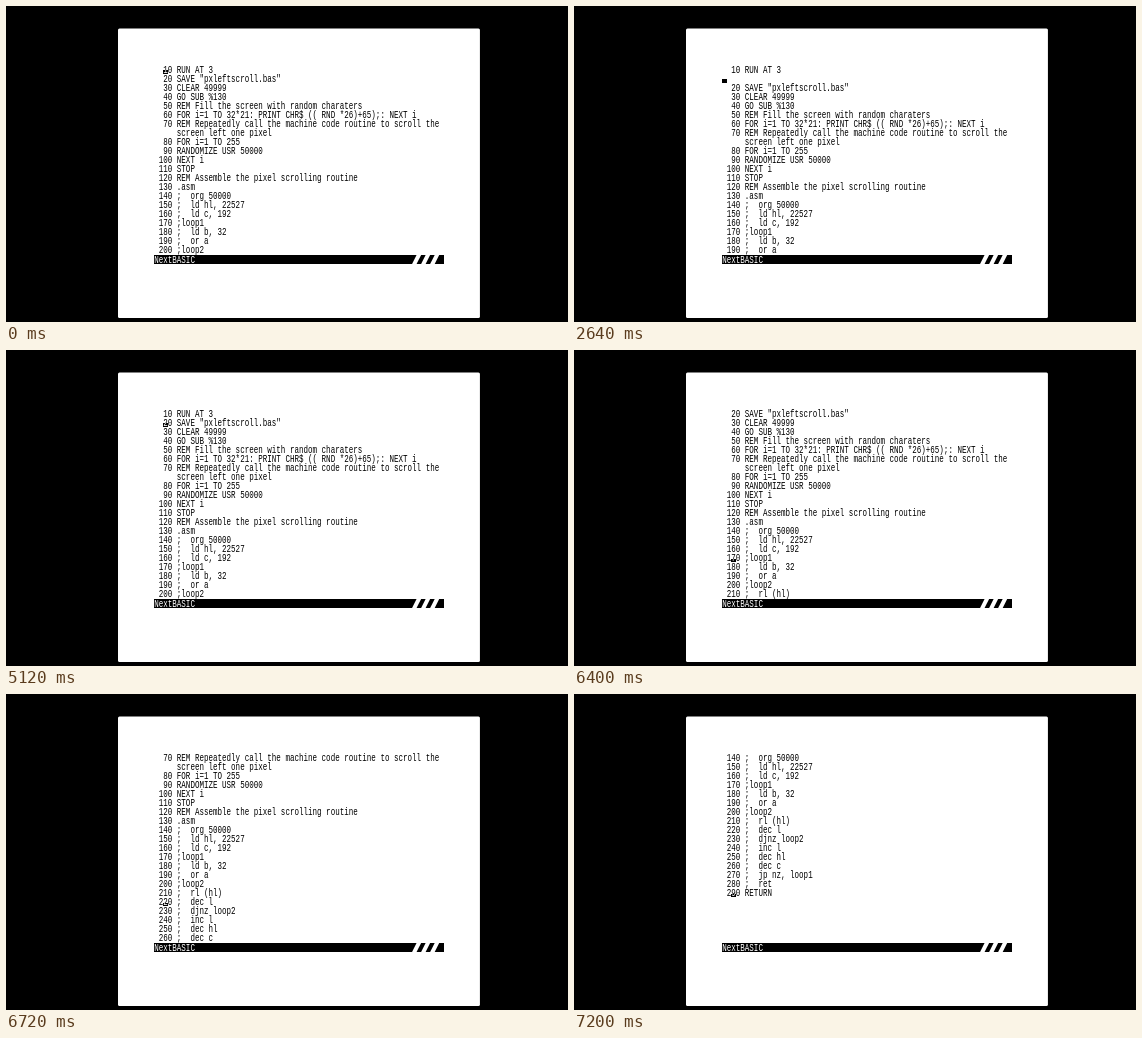
These frames come from a looping animation (562 px wide and 316 px high, 8 s). An HTML page with a canvas:

```html
<!DOCTYPE html>
<html lang="en">
<head>
<meta charset="utf-8">
<title>NextBASIC editor</title>
<style>
  html, body { margin: 0; width: 100%; height: 100%; overflow: hidden; background: #000; }
  canvas { display: block; }
</style>
</head>
<body>
<canvas id="stage" width="562" height="316"></canvas>
<script>
const listing = `  10 RUN AT 3
  20 SAVE "pxleftscroll.bas"
  30 CLEAR 49999
  40 GO SUB %130
  50 REM Fill the screen with random charaters
  60 FOR i=1 TO 32*21: PRINT CHR$ (( RND *26)+65);: NEXT i
  70 REM Repeatedly call the machine code routine to scroll the
     screen left one pixel
  80 FOR i=1 TO 255
  90 RANDOMIZE USR 50000
 100 NEXT i
 110 STOP
 120 REM Assemble the pixel scrolling routine
 130 .asm
 140 ;  org 50000
 150 ;  ld hl, 22527
 160 ;  ld c, 192
 170 ;loop1
 180 ;  ld b, 32
 190 ;  or a
 200 ;loop2
 210 ;  rl (hl)
 220 ;  dec l
 230 ;  djnz loop2
 240 ;  inc l
 250 ;  dec hl
 260 ;  dec c
 270 ;  jp nz, loop1
 280 ;  ret
 290 RETURN`.split('\n');

const LOOP = 8000, STEP = 80;
const OPEN_LINE = 2640, CLOSE_LINE = 5120, SCROLL = 5760;
const ROWS = 21, COLS = 64, SCROLL_ROW = 16;
const PIXEL = 1.131;                       // one screen pixel of the 320 x 256 display
const CELL_W = 4 * PIXEL, CELL_H = 8 * PIXEL;
const PAGE = { x: 112, y: 22.4, w: 320 * PIXEL, h: 256 * PIXEL };
const LEFT = PAGE.x + 32 * PIXEL, TOP = PAGE.y + 32 * PIXEL;
const TALL = 1.37;                         // text pixels are taller than wide

const ctx = document.getElementById('stage').getContext('2d');
const colX = col => LEFT + col * CELL_W;
const rowY = row => TOP + row * CELL_H;

// Fills a rectangle with its edges on whole pixels.
function fillSharp(x, y, w, h, color) {
  const left = Math.round(x), top = Math.round(y);
  ctx.fillStyle = color;
  ctx.fillRect(left, top, Math.round(x + w) - left, Math.round(y + h) - top);
}

function drawText(text, row, color) {
  ctx.save();
  ctx.translate(LEFT, rowY(row) + 7 * PIXEL);
  ctx.scale(1, TALL);
  ctx.font = `${CELL_W / 0.6}px "Liberation Mono", monospace`;
  ctx.fillStyle = color;
  [...text].forEach((char, col) => ctx.fillText(char, col * CELL_W, 0));
  ctx.restore();
}

// The cursor inverts the bottom three pixel rows of its cell.
function drawCursor(col, row) {
  ctx.globalCompositeOperation = 'difference';
  fillSharp(colX(col), rowY(row) + 5 * PIXEL, CELL_W, 3 * PIXEL, '#fff');
  ctx.globalCompositeOperation = 'source-over';
}

function drawStatusBar() {
  const top = Math.round(rowY(ROWS)), bottom = Math.round(rowY(ROWS + 1));
  fillSharp(LEFT, top, COLS * CELL_W, bottom - top, '#000');
  drawText('NextBASIC', ROWS, '#fff');
  ctx.fillStyle = '#fff';
  for (const col of [57, 59, 61]) {
    ctx.beginPath();
    ctx.moveTo(colX(col), bottom);
    ctx.lineTo(colX(col + 1), top);
    ctx.lineTo(colX(col + 2), top);
    ctx.lineTo(colX(col + 1), bottom);
    ctx.fill();
  }
}

function editorState(time) {
  if (time < OPEN_LINE) return { lines: listing, scroll: 0, col: 2, line: 0 };
  if (time < CLOSE_LINE) {
    return { lines: [listing[0], '', ...listing.slice(1)], scroll: 0, col: 0, line: 1 };
  }
  // Cursor down moves two lines per step, and slows once the listing scrolls.
  const step = Math.min(18, Math.floor((time - SCROLL) / STEP));
  const reach = Math.max(1, Math.min(2 + 2 * step, Math.floor(20 + 1.25 * (step - 10))));
  return {
    lines: listing,
    scroll: Math.max(0, reach - SCROLL_ROW),
    col: 2,
    line: Math.min(reach, listing.length - 1)
  };
}

function draw(time) {
  const { lines, scroll, col, line } = editorState(time);
  fillSharp(0, 0, 562, 316, '#000');
  ctx.fillStyle = '#fff';
  ctx.beginPath();
  ctx.roundRect(PAGE.x, PAGE.y, PAGE.w, PAGE.h, 1.5);
  ctx.fill();
  lines.slice(scroll, scroll + ROWS).forEach((text, row) => drawText(text, row, '#000'));
  drawCursor(col, line - scroll);
  drawStatusBar();
}

function tick() {
  draw(performance.now() % LOOP);
  requestAnimationFrame(tick);
}
tick();
</script>
</body>
</html>
```
